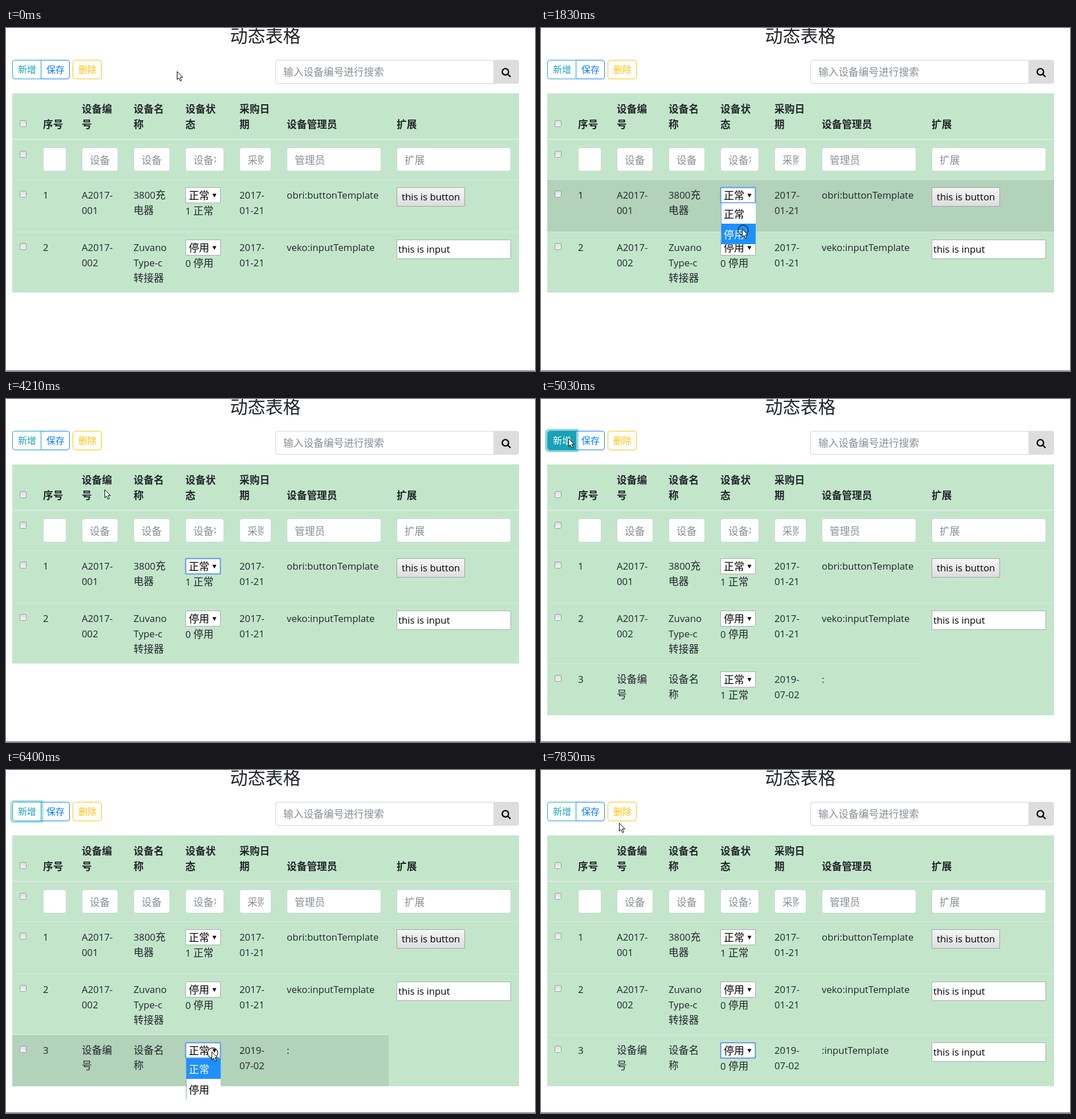
Animation, 929 px wide and 603 px high, one loop 8000 ms. Source, as an HTML page with a canvas:

```html
<!DOCTYPE html>
<html lang="zh">
<head>
<meta charset="utf-8">
<title>动态表格</title>
<style>
html, body { margin: 0; overflow: hidden; background: #fff; }
canvas { display: block; }
</style>
</head>
<body>
<canvas id="stage" width="929" height="603"></canvas>
<script>
const ctx = document.getElementById('stage').getContext('2d');
const LOOP = 8000, INK = '#212529', HINT = '#868e96';
const STATES = ['停用', '正常'], OPTIONS = ['正常', '停用'];
const HEADERS = ['序号', '设备编号', '设备名称', '设备状态', '采购日期', '设备管理员', '扩展'];
const HINTS = ['', '设备编号', '设备名称', '设备状态', '采购日期', '管理员', '扩展'];
const NARROW = [65, 133, 224, 315, 410, 493, 686, 914];
const WIDE = [65, 136, 229, 322, 420, 505, 686, 914];

// Pointer moves: start, step duration, steps, target x, target y
const MOVES = [
  [380, 136, 7, 355, 290], [1450, 125, 3, 353, 353],
  [2380, 144, 4, 352, 292], [3100, 145, 3, 350, 325],
  [3690, 158, 6, 84, 76], [4630, 1, 1, 48, 69],
  [5590, 135, 7, 361, 495], [6670, 140, 2, 354, 545],
  [7490, 1, 1, 306, 367], [7610, 120, 3, 137, 93]
];
const CLICKS = [[1196, 1330], [1830, 1950], [2956, 3100], [3540, 3660], [4910, 5030], [6400, 6550], [6950, 7090]];
const during = (t, ...spans) => spans.some(([a, b]) => t >= a && t < b);

function pointerAt(t) {
  let x = 300, y = 76;
  for (const [start, step, count, toX, toY] of MOVES) {
    if (t < start) break;
    const f = Math.min(count, Math.floor((t - start) / step) + 1) / count;
    x += (toX - x) * f;
    y += (toY - y) * f;
  }
  return { x: Math.round(x), y: Math.round(y) };
}

function text(s, x, y, color = INK, size = 17.7, weight = 400) {
  ctx.fillStyle = color;
  for (const run of s.match(/[\x00-\x7f]+|[^\x00-\x7f]+/g) || []) {
    const latin = run.charCodeAt(0) < 128;
    ctx.font = `${weight} ${latin ? size * 0.95 : size}px ` +
      (latin ? '"Open Sans", sans-serif' : '"Noto Sans CJK SC", "Noto Sans CJK", sans-serif');
    ctx.fillText(run, x, y);
    x += ctx.measureText(run).width;
  }
}

function rect(x, y, w, h, fill) {
  ctx.fillStyle = fill;
  ctx.fillRect(x, y, w, h);
}

function box(x, y, w, h, fill, stroke, radius = 0, line = 1) {
  ctx.beginPath();
  ctx.roundRect(x + 0.5, y + 0.5, w - 1, h - 1, radius);
  ctx.fillStyle = fill;
  ctx.fill();
  ctx.strokeStyle = stroke;
  ctx.lineWidth = line;
  ctx.stroke();
}

function gradient(y, h, from, to) {
  const g = ctx.createLinearGradient(0, y, 0, y + h);
  g.addColorStop(0, from);
  g.addColorStop(1, to);
  return g;
}

function checkbox(y) {
  box(24, y - 6, 12, 12, gradient(y - 6, 12, '#dcdcdc', '#f4f4f4'), '#999', 2);
}

function field(x, y, w, hint) {
  box(x, y, w, 42, '#fff', '#ced4da', 4);
  ctx.save();
  ctx.beginPath();
  ctx.rect(x + 14, y, w - 28, 42);
  ctx.clip();
  text(hint, x + 14, y + 29, HINT);
  ctx.restore();
}

function button(label, x, color, radius, pointer) {
  const hover = pointer.y >= 56 && pointer.y < 90 && pointer.x >= x && pointer.x < x + 51;
  box(x, 56, 51, 34, hover ? color : '#fff', color, radius);
  text(label, x + 10, 79, hover ? '#fff' : color, 16);
}

function toolbar(t, p) {
  text('动态表格', 393.5, 25, INK, 31);
  button('保存', 61, '#007bff', [0, 4, 4, 0], p);
  button('删除', 117, '#ffc107', 4, p);
  button('新增', 11, '#17a2b8', [4, 0, 0, 4], p);
  if (during(t, [4910, 6550])) {
    ctx.beginPath();
    ctx.roundRect(9, 54.5, 55, 37, [5, 1, 1, 5]);
    ctx.strokeStyle = `rgba(23,162,184,${t < 6400 ? 0.5 : 0.35})`;
    ctx.lineWidth = 3.5;
    ctx.stroke();
  }
  box(473, 56, 384, 42, '#fff', '#ced4da', [4, 0, 0, 4]);
  text('输入设备编号进行搜索', 487, 84, HINT);
  box(856, 56, 45, 42, '#ddd', '#ddd', [0, 4, 4, 0]);
  ctx.strokeStyle = '#000';
  ctx.lineWidth = 2.4;
  ctx.beginPath();
  ctx.arc(877, 77, 5.6, 0, 7);
  ctx.moveTo(881, 81);
  ctx.lineTo(886, 86);
  ctx.stroke();
}

function select(x, y, label, focused) {
  box(x, y, 62, 28, '#fff', '#a9a9a9');
  if (focused) box(x, y, 62, 28, '#fff', '#5b96ec', 1, 2);
  text(label, x + 6, y + 21, '#000', 18);
  ctx.beginPath();
  ctx.moveTo(x + 47.5, y + 11.5);
  ctx.lineTo(x + 54.5, y + 11.5);
  ctx.lineTo(x + 51, y + 18);
  ctx.fill();
}

function drawRow(row, index, cols, p) {
  const { top, height, value, cells, owner, template, focused } = row;
  const y = top + 14, base = y + 20;
  const width = template ? 890 : 661;
  if (p.y >= top && p.y < top + height && p.x >= 11 && p.x < 11 + width)
    rect(11, top, width, height, 'rgba(0,0,0,.085)');
  rect(11, top, width, 1, '#dee8e2');
  checkbox(y + 12);
  text(String(index + 1), cols[0], base);
  cells.forEach((lines, i) =>
    lines.forEach((s, n) => text(s, cols[[1, 2, 4][i]], base + n * 27)));
  select(cols[3], y, STATES[value], focused);
  text(`${value} ${STATES[value]}`, cols[3], y + 48);
  text(`${owner}:${template}`, cols[5], base);
  if (template === 'buttonTemplate') {
    box(686, y, 120, 34, gradient(y, 34, '#f6f6f6', '#dcdcdc'), '#a0a0a0');
    text('this is button', 695, y + 23, '#000');
  } else if (template) {
    box(686, y, 201, 34, '#fff', '#a9a9a9');
    text('this is input', 689, y + 23, '#000');
  }
}

function popup(row, x, p) {
  const y = row.top + 42;
  const over = Math.floor((p.y - y) / 36);
  const active = over >= 0 && over < 2 ? over : 1 - row.value;
  rect(x + 1, y, 61, 72, '#6f9fe0');
  rect(x + 2, y, 60, 72, '#fff');
  rect(x + 2, y + active * 36, 60, 36, '#1e90ff');
  OPTIONS.forEach((s, i) => text(s, x + 6, y + 26 + i * 36, i === active ? '#fff' : '#000', 18));
}

function drawPointer({ x, y }, clicking) {
  if (clicking) {
    ctx.beginPath();
    ctx.arc(x + 2, y + 2.5, 9, 0, 7);
    ctx.strokeStyle = '#222';
    ctx.lineWidth = 1.3;
    ctx.stroke();
  }
  ctx.save();
  ctx.translate(x, y);
  const arrow = new Path2D('M.5.5V14.5L3.6 11.6 6 17.2 8.4 16.2 6 10.7H10.4Z');
  ctx.fillStyle = '#fff';
  ctx.fill(arrow);
  ctx.strokeStyle = '#000';
  ctx.lineWidth = 1;
  ctx.stroke(arrow);
  ctx.restore();
}

function draw(t) {
  const p = pointerAt(t);
  const stopped = during(t, [1950, 3660]);
  const cols = stopped ? WIDE : NARROW;
  const rows = [
    { top: 266, height: 92, value: stopped ? 0 : 1, owner: 'obri',
      template: stopped ? 'inputTemplate' : 'buttonTemplate',
      cells: [['A2017-', '001'], ['3800充', '电器'], ['2017-', '01-21']],
      focused: during(t, [1196, 4910]), open: during(t, [1196, 1950], [2956, 3660]) },
    { top: 358, height: 107, value: 0, owner: 'veko', template: 'inputTemplate',
      cells: [['A2017-', '002'], ['Zuvano', 'Type-c', '转接器'], ['2017-', '01-21']] }
  ];
  if (t >= 5030) rows.push({
    top: 465, height: 91, value: t < 7090 ? 1 : 0, owner: '',
    template: t < 7090 ? '' : 'inputTemplate',
    cells: [['设备编', '号'], ['设备名', '称'], ['2019-', '07-02']],
    focused: t >= 6400, open: during(t, [6400, 7090])
  });

  rect(0, 0, 929, 603, '#fff');
  rect(0, 602, 929, 1, '#666');
  toolbar(t, p);

  const last = rows[rows.length - 1];
  rect(11, 115, 890, last.top + last.height - 115, '#c3e6cb');
  rect(11, 195, 890, 1.5, '#e6eeea');
  checkbox(168);
  checkbox(222);
  HEADERS.forEach((s, i) => {
    const split = i > 0 && i < 5 && !(stopped && i === 3);
    if (split) text(s.slice(0, 3), cols[i], 149, INK, 17.7, 700);
    text(split ? s[3] : s, cols[i], 176, INK, 17.7, 700);
    field(cols[i], 210, cols[i + 1] - cols[i] - 27, HINTS[i]);
  });
  rows.forEach((row, i) => drawRow(row, i, cols, p));
  rows.filter(row => row.open).forEach(row => popup(row, cols[3], p));
  drawPointer(p, during(t, ...CLICKS));
}

const began = performance.now();
function tick() {
  draw((performance.now() - began) % LOOP);
  requestAnimationFrame(tick);
}
tick();
</script>
</body>
</html>
```
